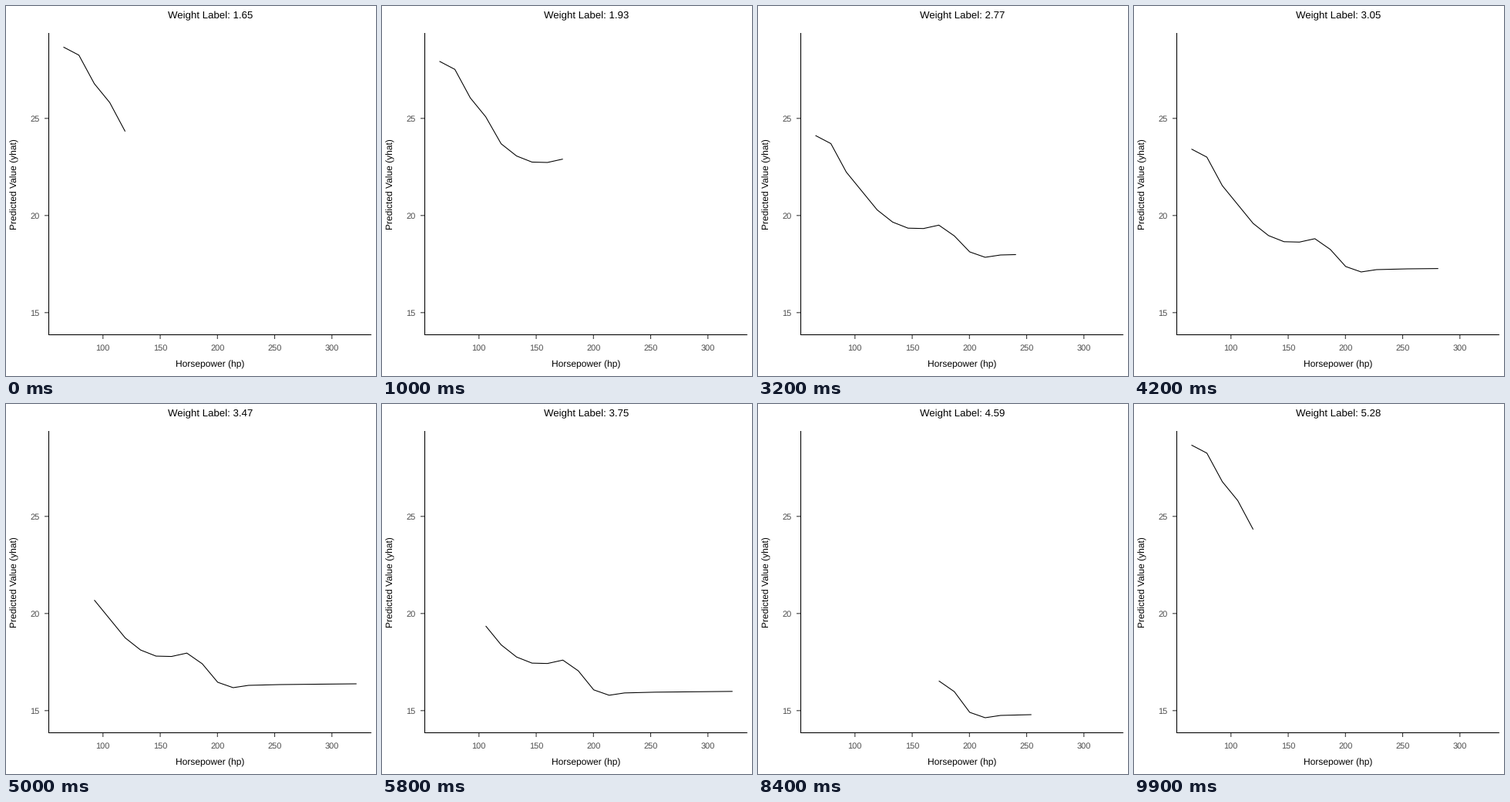
Recreate the animation shown at these times as a matplotlib script. Size 480 by 480 pixels, loop 10 s.

```python
import numpy as np
import matplotlib.pyplot as plt
from matplotlib.animation import FuncAnimation

SIZE, DPI, FRAMES, STEP_MS = 480, 100, 100, 100
PX = 72 / DPI
STATES = 27
plt.rcParams["font.family"] = "Liberation Sans"
plt.rcParams["text.hinting"] = "none"

# Grid of horsepower and weight values, clipped to the convex hull of the data.
HP = 52 + np.arange(1, 21) * 283 / 21
WEIGHT = 1.513 + np.arange(1, STATES + 1) * 3.911 / 28
HP_MIN = np.interp(WEIGHT, [1.615, 3.19, 5.424], [52, 62, 215])
HP_MAX = np.interp(WEIGHT, [1.513, 3.57, 5.345, 5.424], [113, 335, 230, 215])

# Stage height of the curve at 200 hp: a few drops as the weight grows.
LEVEL = np.interp(np.arange(1, STATES + 1),
                  [1, 2, 5, 6, 7, 9, 12, 13, 14, 15, 21, 23, 27],
                  [209, 209, 235, 301, 315, 319, 338, 360, 361, 370.5,
                   372.5, 400, 401])
# Common curve shape around that height, by grid column.
SHAPE = np.interp(np.arange(1, 21),
                  [1, 2, 3, 5, 6, 7, 8, 9, 10, 11, 12, 13, 15, 20],
                  [-151, -140.5, -103.5, -54.5, -38.7, -30.8, -30.3, -34.7,
                   -20.8, 0, 7, 4, 3, 2])


def x_pos(hp):
    return 125.8 + (hp - 100) * 1.485


def y_pos(value):
    return 145.8 + (25 - value) * 25.2


def curve(state):
    level = LEVEL[state]
    y = level + SHAPE
    # Weight matters a little less below 200 hp, except for light, weak cars.
    y[HP < 200] -= 0.075 * (level - 319)
    y[HP < 110] -= np.interp(level, [209, 301], [13, 0])
    inside = (HP >= HP_MIN[state]) & (HP <= HP_MAX[state])
    return x_pos(HP[inside]), y[inside]


CURVES = [curve(s) for s in range(STATES)]
HOLD = [2] * 21 + [1] * 6
MOVE = [2] * 12 + [1] + [2] * 14


def states_at(frame):
    """Return the states shown by the line and by the title."""
    line_state = title_state = t = 0
    for s in range(STATES):
        following = (s + 1) % STATES
        t += HOLD[s]
        if frame >= t:
            line_state = following
        t += MOVE[s]
        if frame >= t - 1:
            title_state = following
    return line_state, title_state


fig = plt.figure(figsize=(SIZE / DPI, SIZE / DPI), dpi=DPI, facecolor="white")
ax = fig.add_axes([0, 0, 1, 1])
ax.set(xlim=(0, SIZE), ylim=(SIZE, 0))
ax.axis("off")


def stroke(xs, ys, color="black"):
    return ax.plot(xs, ys, color=color, lw=1.07 * PX, snap=False,
                   solid_capstyle="butt", solid_joinstyle="round")[0]


def label(x, y, text, size, color="black", ha="center", **kw):
    return ax.text(x, y, text, fontsize=size * PX, color=color, ha=ha,
                   va="baseline", **kw)


for hp in range(100, 301, 50):
    stroke([x_pos(hp)] * 2, [426.5, 432], "#333333")
    label(x_pos(hp), 447, str(hp), 11, "#4d4d4d")
for value in (15, 20, 25):
    stroke([50, 55.5], [y_pos(value)] * 2, "#333333")
    label(43.5, y_pos(value) + 4, str(value), 11, "#4d4d4d", ha="right")
stroke([55.5, 55.5], [35, 427])
stroke([55, 474], [426.5, 426.5])

label(264.8, 469, "Horsepower (hp)", 12)
label(15, 231, "Predicted Value (yhat)", 12, rotation=90,
      rotation_mode="anchor")
title = label(264.8, 16, "", 13.2)
line = stroke([], [])


def update(frame):
    line_state, title_state = states_at(frame)
    line.set_data(*CURVES[line_state])
    title.set_text(f"Weight Label: {WEIGHT[title_state]:.2f}")
    return line, title


anim = FuncAnimation(fig, update, frames=FRAMES, interval=STEP_MS,
                     repeat=True, repeat_delay=0)
plt.show()
```
